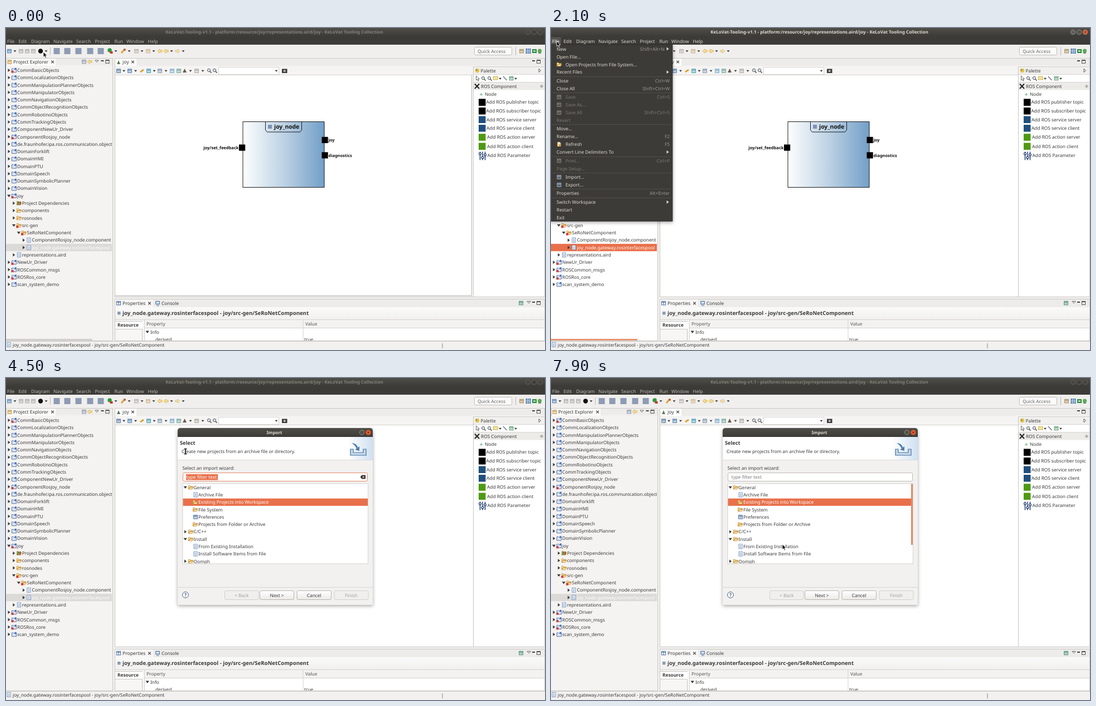
Recreate the animation shown at these times as an HTML page. Size 967 by 579 pixels, loop 8000 ms.

```html
<!DOCTYPE html>
<html lang="en">
<head>
<meta charset="utf-8">
<title>Modelling workbench</title>
<style>
html, body { margin: 0; width: 100%; height: 100%; overflow: hidden; background: #f2f1f0; }
svg { display: block; width: 967px; height: 579px; font: 8.3px "Noto Sans", "Open Sans", sans-serif; text-rendering: geometricPrecision; }
text { white-space: pre; }
</style>
</head>
<body>
<svg id="stage" viewBox="0 0 967 579" xmlns="http://www.w3.org/2000/svg"></svg>
<script>
const INK = '#3a3a3a', PALE = '#dfdbd2', DIM = '#7c7971', DARK = '#3c3b37', ORANGE = '#e8704a';
const BG = '#f2f1f0', LINE = '#c9c6c2';

const esc = s => s.replace(/&/g, '&amp;').replace(/</g, '&lt;').replace(/>/g, '&gt;');
// y is the middle of the text line
const text = (x, y, s, fill = INK, extra = '') =>
  `<text x="${x}" y="${y + 3}" fill="${fill}" ${extra}>${esc(s)}</text>`;
const bold = (x, y, s, size = 8.3, fill = INK, extra = '') =>
  text(x, y, s, fill, `font-weight="700" font-size="${size}" ${extra}`);
const box = (x, y, w, h, fill, extra = '') =>
  `<rect x="${x}" y="${y}" width="${w}" height="${h}" fill="${fill}" ${extra}/>`;
const path = (d, fill, extra = '') => `<path d="${d}" fill="${fill}" ${extra}/>`;
const line = (d, stroke, w = 1) => path(d, 'none', `stroke="${stroke}" stroke-width="${w}"`);
const dot = (x, y, r, fill, extra = '') => `<circle cx="${x}" cy="${y}" r="${r}" fill="${fill}" ${extra}/>`;
const group = (id, body, extra = '') => `<g id="${id}" ${extra}>${body}</g>`;

const down = (x, y, c = '#333') => path(`M${x - 2.5} ${y - 1.2}h5l-2.5 3z`, c);
const right = (x, y, c = '#333') => path(`M${x - 1.5} ${y - 3}v6l4-3z`, c);
const twisty = (x, y, open) => open ? path(`M${x - 3} ${y - 2}h6.4l-3.2 4.4z`, INK) : right(x, y, INK);
const folder = (x, y) => path(`M${x - 4} ${y + 3.2}v-6.4h3l1 1.4h4v1.2h-6l-2 3.8 2.2-3.2h6.4l-2 3.2z`,
  '#fbe3ac', 'stroke="#c08a2c" stroke-width=".8"');
const page = (x, y, c = '#5b7fb5') => box(x - 3, y - 4, 6.2, 8, '#fff', `stroke="${c}" stroke-width=".8"`) +
  line(`M${x - 1.6} ${y - 1.5}h3.4M${x - 1.6} ${y + .3}h3.4M${x - 1.6} ${y + 2}h3.4`, c, .7);
const project = (x, y, bad) => path(`M${x - 4} ${y + 3.6}v-6.6h3l1 1.2h4v5.4z`, '#dbe6f6', 'stroke="#49679f" stroke-width=".9"') +
  box(x + 1, y - 4.2, 3.4, 3.4, '#4a74bd') + (bad ? box(x - 5, y + .6, 4, 4, '#d9363a') : '');
const block = (x, y, c) => box(x - 3.4, y - 3.2, 6.8, 6.6, c, 'fill-opacity=".35" stroke="' + c + '" stroke-width=".9"') +
  line(`M${x - 3.4} ${y - 1.4}h6.8`, c, 1);
const backArrow = (x, y, dir, c = '#d8a52c') =>
  path(`M${x - 4 * dir} ${y}l${4 * dir} -3.5v2h${4 * dir}v3h${-4 * dir}v2z`, '#f8e3a6', `stroke="${c}" stroke-width=".8"`);
const cross = (x, y, c = '#555') => line(`M${x - 2.3} ${y - 2.3}l4.6 4.6m0 -4.6l-4.6 4.6`, c, 1.3);
const lens = (x, y) => dot(x - 1, y - 1, 2.6, '#dcebf8', 'stroke="#555" stroke-width="1"') + line(`M${x + 1} ${y + 1}l2.6 2.6`, '#555', 1.5);
const paneButtons = (x, y) => line(`M${x} ${y - 1.5}h5`, '#444', 2) +
  box(x + 8.5, y - 2.8, 6, 5.6, '#fff', 'stroke="#444"') + line(`M${x + 8.5} ${y - 2.2}h6`, '#444', 1.4);

function titleBar(on) {
  const ring = on ? '#8b8880' : '#66645e';
  return text(481.5, 7, 'KeLoVat-Tooling-v1.1 - platform:/resource/joy/representations.aird/joy - KeLoVat Tooling Collection',
      on ? PALE : '#85827b', 'text-anchor="middle" font-weight="700" font-size="7.95"') +
    [936.5, 947.5, 958.5].map((x, i) => dot(x, 7.5, 4.4, on && i == 2 ? '#ea5a30' : on ? '#6b6963' : '#4b4a45', `stroke="${ring}" stroke-width=".7"`)).join('') +
    line('M934.5 7.5h4M945.8 5.8h3.6v3.4h-3.6zM957 6l3 3m0 -3l-3 3', on ? '#33322e' : '#2e2d2a', .9) +
    [['File', 2], ['Edit', 22.5], ['Diagram', 45], ['Navigate', 85], ['Search', 126], ['Project', 159.5],
     ['Run', 194.5], ['Window', 216], ['Help', 254.5]].map(([s, x]) => text(x, 23.5, s, on ? PALE : '#bdb9b1')).join('');
}

function toolbar() {
  const marks = [[6, '#4d7fb5'], [27, '#a9a9a9'], [38, '#a9a9a9'], [49, '#a9a9a9'], [234, '#b5b0a6'], [255, '#cbb68a'], [925, '#a58a55']];
  return box(0, 30, 967, 22, '#f0efed') +
    marks.map(([x, c]) => block(x, 41.5, c)).join('') +
    dot(62, 41.5, 4.2, '#111') +
    [91, 110, 130, 151, 170].map(x => box(x - 5.5, 36, 11, 11, '#8d9bb3')).join('') +
    dot(186, 40, 3.8, '#2f9a45') + box(186.5, 42, 5, 4, '#c33a32') +
    line('M207 45l6-7', '#e0a040', 3) + dot(213, 39, 2, '#b5652a') +
    backArrow(276, 41.5, 1) + backArrow(287, 41.5, 1) + backArrow(308, 41.5, -1, '#cfb87d') +
    [16, 72, 197, 221, 244, 265, 297, 318].map(x => down(x, 41.5)).join('') +
    line('M79.5 35v13M914.5 34v15', '#bdbab5') +
    box(840.5, 34.5, 67, 14, '#fbfbfa', 'rx="2" stroke="#c0bdb8"') + text(846, 41.5, 'Quick Access', '#666') +
    box(932.5, 37, 9, 9, '#3d6da8') + line('M935.5 37v9M938.5 37v9M932.5 40h9M932.5 43h9', '#fff', .8) +
    box(944, 38, 8, 7, '#2e8b3d') + line('M946 41.5h4', '#fff', 2) + dot(957.5, 41, 3.6, '#5da95a') + line('M955 45l5 0', '#4b7e4a', 1.6);
}

const TREE = `0-!CommBasicObjects|0-CommLocalizationObjects|0-CommManipulationPlannerObjects|0-CommManipulatorObjects|0-CommNavigationObjects|0-CommObjectRecognitionObjects|0-CommRobotinoObjects|0-CommTrackingObjects|0-ComponentNewUr_Driver|0-!ComponentRosjoy_node|0-de.fraunhofer.ipa.ros.communication.objects|0-DomainForklift|0-DomainHMI|0-DomainPTU|0-DomainSpeech|0-DomainSymbolicPlanner|0-DomainVision|0+!joy|1-Project Dependencies|1-components|1-rosnodes|1+!src-gen|2+!SeRoNetComponent|3-ComponentRosjoy_node.component|3-joy_node.gateway.rosinterfacespool|1-representations.aird|0-!NewUr_Driver|0-!ROSCommon_msgs|0-!ROSRos_core|0-scan_system_demo`;
const PICKED = 24;

function tree(on) {
  const rows = TREE.split('|').map((row, i) => {
    const [, lvl, sign, bad, name] = row.match(/(\d)(.)(!?)(.*)/);
    const y = 76 + i * 13.28, x = 5 + lvl * 8.8, ix = x + 9.5;
    const isFile = lvl == 3 || name.endsWith('.aird');
    const icon = lvl == 0 ? project(ix, y, bad) : isFile ? page(ix, y) :
      folder(ix, y) + (i == 18 ? box(ix - 3, y - 3, 3, 6, '#4d8b53') + box(ix + .5, y - 3, 3, 6, '#b55b34') : '') +
      (bad ? box(ix - 5, y + .6, 4, 4, '#d9363a') : '');
    const hit = i == PICKED;
    return (hit ? box(0, y - 6.6, 191, 13.2, on ? ORANGE : '#dcdad7') : '') +
      twisty(x, y, sign == '+') + icon + text(x + 15, y, name, hit ? '#fff' : INK);
  }).join('');
  return box(0, 68, 191, 494, on ? '#fff' : '#f4f3f1') + `<g clip-path="url(#treeClip)">${rows}</g>`;
}

function explorer() {
  return box(0.5, 54.5, 191, 508, '#fafaf9', `stroke="${LINE}"`) + box(89, 55, 102, 12.5, '#edecea') +
    block(6.5, 61, '#c9963d') + text(13, 61, 'Project Explorer', INK, 'font-size="8.45"') + cross(83.5, 61) +
    block(140, 60.5, '#8d9bb3') + backArrow(150, 60.5, 1) + path('M160 58h6l-3 3.5z', '#fff', 'stroke="#444" stroke-width=".8"') + paneButtons(170.5, 60.5);
}

function editor() {
  const tools = [[202, '#51779e'], [222, '#4f7fb0'], [256, '#3f9bb5'], [276, '#7f93ad'], [298, '#74a6cb'], [310, '#6aa19a'], [342, '#aba79f']];
  return box(195.5, 54.5, 771, 429, '#fff', `stroke="${LINE}"`) + box(234, 55, 732, 13, '#edecea') +
    box(196, 68, 642, 16, '#f5f4f3') + line('M196 84.5h642', '#d5d2ce') +
    path('M199 65l3-7 3 7z', '#5c7c57') + text(209, 61, 'joy', INK, 'font-size="8.6"') + cross(227.5, 61) + paneButtons(944, 60.5) +
    tools.map(([x, c]) => block(x, 77, c)).join('') +
    line('M241 79l6-4', '#d9a431', 3) + path('M317 80l3.5-7 3.5 7z', '#6b5b49') +
    [211.5, 232.5, 266, 287, 331, 353].map(x => down(x, 77)).join('') + lens(365, 77) + lens(375, 77) +
    box(381.5, 70.5, 108, 13, '#fff', 'stroke="#d9d6d2"') + down(485, 77) +
    box(495, 73.5, 9.5, 7.5, '#3b3b3b') + dot(499.7, 77.3, 2, '#bbb') +
    box(425, 168.5, 146, 118, 'url(#steel)', 'stroke="#1b1b1b"') +
    path('M465.5 168.5v15l3 3.5h59l3-3.5v-15z', 'none', 'stroke="#1b1b1b"') +
    box(470, 174, 7, 7, '#7d92b4') + bold(481, 177.6, 'joy_node', 10.3, '#111') +
    [[418, 209.5], [566.5, 195.8], [566.5, 223.3]].map(([x, y]) => box(x, y, 11.2, 11.2, '#000')).join('') +
    bold(417.5, 214.5, 'joy/set_feedback', 7.55, '#111', 'text-anchor="end"') +
    bold(578.5, 200.8, 'joy', 7.5, '#111') + bold(578.5, 228.5, 'diagnostics', 7.4, '#111');
}

function palette() {
  const items = [['publisher topic', 861.5, 133.4, '#000'], ['subscriber topic', 861.5, 149, '#000'], ['service server', 862, 164.5, '#204f7e'],
    ['service client', 862, 180, '#204f7e'], ['action server', 863, 196.2, '#4e9a14'], ['action client', 863, 212.5, '#4e9a14']];
  return box(838.5, 69.5, 128, 414, '#fff', `stroke="${LINE}"`) + box(839, 70, 127, 13.5, '#f1f0ee') +
    dot(845.5, 76.5, 3.8, '#e6c34d') + dot(844, 75.5, 1.2, '#4b8b50') + text(851.5, 76.5, 'Palette') +
    path('M956 73.5v6l3.5-3z', '#fff', 'stroke="#444" stroke-width=".9"') + line('M839 83.5h127M839 97.5h127', '#d8d5d1') +
    path('M843.5 86v8l2-1.8 1.5 3 1.2-.7-1.4-2.9h2.6z', '#fff', 'stroke="#444" stroke-width=".8"') + lens(857, 91) + lens(868, 91) +
    box(874.5, 87.5, 7.5, 5.5, '#f7e79b', 'stroke="#b99d33" stroke-width=".8"') + down(886.5, 91) +
    line('M892 87l6.5 7', '#5f6b82', 1.2) + block(906.5, 90.5, '#5a9a6e') + down(914.5, 91) +
    box(839, 98, 127, 13.5, '#ecebe8') + line('M841 109l8-8.5m-8 0l8 8.5', '#222', 2) + text(852, 105, 'ROS Component') +
    path('M958 104.8l2.5-2.2v4.4zM963.5 104.8l-2-2.2v4.4z', 'none', 'stroke="#888" stroke-width=".7"') +
    path('M849.5 119.5l3.2-3.2 3.2 3.2-3.2 3.2z', '#9cc9a8', 'stroke="#fff"') + text(859, 119.4, 'Node') +
    items.map(([s, x, y, c]) => box(848, y - 6, 12.5, 12.5, c) + text(x, y, 'Add ROS ' + s)).join('') +
    line('M850.5 222.5v15M855 222.5v15M859.5 222.5v15', '#1f3d74', 1.5) +
    [[850.5, 226], [855, 233], [859.5, 228]].map(([x, y]) => dot(x, y, 1.9, '#fff', 'stroke="#1f3d74" stroke-width="1.3"')).join('') + text(863.5, 229.4, 'Add ROS Parameter');
}

const SPOT = 'joy_node.gateway.rosinterfacespool - joy/src-gen/SeRoNetComponent';
function properties() {
  return box(195.5, 487.5, 771, 75, '#f7f6f5', `stroke="${LINE}"`) + box(264, 488, 702, 14, '#edecea') +
    box(198.5, 491.5, 7, 6.5, '#fff', 'stroke="#466b9c"') + line('M198.5 493.5h7M202 492v6', '#466b9c') +
    text(209, 495, 'Properties', INK, 'font-size="8.5"') + cross(257.5, 495) +
    box(268.8, 491.5, 6.5, 5, '#d8e6f5', 'stroke="#3f6797"') + line('M270 499h4.5', '#3f6797') + text(279, 495.2, 'Console') +
    block(924, 494.5, '#4f8f7d') + path('M935 491.5h6l-3 3.5z', '#fff', 'stroke="#444" stroke-width=".8"') + paneButtons(944, 494.5) +
    box(196, 502, 770, 22, 'url(#band)') + line('M196 524.5h770', '#d5d2ce') +
    box(200, 510, 5.5, 5.5, '#8d9bb3') + bold(209, 512.6, SPOT, 9.6) +
    box(196, 527.5, 49, 13.5, '#fff') + line('M196 527.5h49M196 541.5h48.5v20.5', LINE) + bold(200, 534, 'Resource') +
    box(248, 525, 718, 37, '#fff') + box(248, 525, 718, 14, '#f3f2f1') +
    line('M248.5 525v37M533 525v37M248 539.5h718', '#d5d2ce') +
    text(252, 532, 'Property', '#555') + text(537, 532, 'Value', '#555') + twisty(253.5, 546.5, true) + text(259, 546.5, 'Info') +
    `<g clip-path="url(#propClip)">${text(268, 560, 'derived')}${text(535, 560, 'true')}</g>`;
}

function menuPanel(w, h, rows, seps) {
  return rows.map(r => {
    const [flag, s, y, x, key] = r, c = flag.includes('d') ? DIM : PALE;
    return text(x, y, s, c) + (key ? text(w - 5, y, key, flag.includes('d') ? DIM : '#9a978f', 'text-anchor="end"') : '') +
      (flag.includes('>') ? right(w - 9, y, PALE) : '') +
      (flag.includes('i') ? block(x - 11.5, y, flag.includes('d') ? '#85827a' : '#9db4cc') : '');
  }).join('') + seps.map(y => line(`M2 ${y + .5}h${w - 4}`, '#4f4e49')).join('');
}

function editMenu() {
  const rows = [['d', 'Undo', 37, 27, 'Ctrl+Z'], ['d', 'Redo', 51, 27, 'Shift+Ctrl+Z'], ['d', 'Cut', 67, 27, 'Ctrl+X'],
    ['i', 'Copy', 81, 27, 'Ctrl+C'], ['di', 'Paste', 95, 27, 'Ctrl+V'], ['', 'Delete', 110, 27], ['d', 'Select All', 124, 10.5, 'Ctrl+A'],
    ['d', 'Deselect All', 138, 27], ['d', 'Find/Replace...', 154, 10.5, 'Ctrl+F'], ['', 'Add Bookmark...', 169, 10.5], ['', 'Add Task...', 183, 10.5],
    ['di', 'Copy format', 198.5, 27, 'Shift+Ctrl+Alt+C'], ['di', 'Paste format', 212.5, 27, 'Shift+Ctrl+Alt+V'], ['di', 'Paste layout', 226.5, 27], ['di', 'Paste style', 240.5, 27]];
  return box(21, 16.5, 20, 14, '#55544f', 'rx="2"') + text(22.5, 23.5, 'Edit', '#fff') +
    box(20, 30, 155.5, 217, DARK, 'stroke="#2f2e2b" stroke-width=".8" filter="url(#shade)"') +
    `<g transform="translate(20 0)">${menuPanel(155, 217, rows, [59, 102, 146, 161, 190])}${backArrow(15.5, 37, 1, '#8b7c52')}${backArrow(15.5, 51, -1, '#8b7c52')}${cross(15.5, 110, '#e04a3c')}${cross(15.5, 67, DIM)}</g>`;
}

function fileMenu() {
  const a = 10, b = 26;
  const rows = [['>', 'New', 37.5, a], ['', 'Open File...', 51.5, a], ['', 'Open Projects from File System...', 65.5, b], ['>', 'Recent Files', 79.3, a],
    ['', 'Close', 94.8, a, 'Ctrl+W'], ['', 'Close All', 108.5, a, 'Shift+Ctrl+W'], ['di', 'Save', 124, b, 'Ctrl+S'], ['di', 'Save As...', 138, b],
    ['di', 'Save All', 152, b, 'Shift+Ctrl+S'], ['d', 'Revert', 166, a], ['', 'Move...', 181.3, a], ['', 'Rename...', 195.3, a, 'F2'], ['', 'Refresh', 209, b, 'F5'],
    ['>', 'Convert Line Delimiters To', 223, a], ['di', 'Print...', 238.5, b, 'Ctrl+P'], ['d', 'Page Setup...', 252.5, a], ['i', 'Import...', 268, b],
    ['i', 'Export...', 282, b], ['', 'Properties', 297.3, a, 'Alt+Enter'], ['>', 'Switch Workspace', 313, a], ['', 'Restart', 327, a], ['', 'Exit', 340.8, a]];
  return box(0, 16.5, 18, 14, '#55544f', 'rx="2"') + text(2, 23.5, 'File', '#fff') +
    box(-1, 30, 219, 317.5, DARK, 'stroke="#2f2e2b" stroke-width=".8" filter="url(#shade)"') +
    box(0, 0, 218, 13.6, 'url(#warm)', 'id="hover"') +
    menuPanel(218, 317, rows, [87, 116, 173, 231, 260, 289, 305]) + text(203.5, 37.5, 'Shift+Alt+N', '#9a978f', 'text-anchor="end"') +
    folder(14.5, 65.5) + path('M11.5 205h4l2 2v6h-6z', '#f0dfae') + dot(15.5, 211, 2, '#d6a032');
}

const button = (x, w, s, off) => box(x + .5, 382.5, w - 1, 16, off ? '#f0efed' : 'url(#btn)', `rx="2.5" stroke="${off ? '#d3d0cc' : '#b8b4ae'}"`) +
  text(x + w / 2, 390.8, s, off ? '#a3a09b' : INK, 'text-anchor="middle"');

const WIZARDS = ['General', 'Archive File', 'Existing Projects into Workspace', 'File System', 'Preferences',
  'Projects from Folder or Archive', 'C/C++', 'Install', 'From Existing Installation', 'Install Software Items from File', 'Oomph'];
const rowY = i => 196.7 + i * 13.28;

function dialog() {
  const rows = WIZARDS.map((s, i) => {
    const y = rowY(i), top = [0, 6, 7, 10].includes(i);
    if (top) return twisty(321.5, y, i == 0 || i == 7) + folder(331.5, y) + text(336.5, y, s);
    const icon = i == 1 || i > 7 ? page(340, y) : i == 4 ? block(340, y, '#4a6f9f') : folder(339.5, y);
    return icon + `<text id="w${i}" x="345" y="${y + 3}" fill="${INK}">${s}</text>`;
  }).join('');
  return path('M308 408V95q0-5 5-5h340q5 0 5 5v313z', BG, 'filter="url(#shade)"') +
    path('M308 106V95q0-5 5-5h340q5 0 5 5v11z', 'url(#bar)') + bold(481.5, 98, 'Import', 8, PALE, 'text-anchor="middle"') +
    dot(638.5, 98, 4.4, '#6b6963', 'stroke="#8b8880" stroke-width=".7"') + dot(650, 98, 4.6, '#ea5a30') +
    line('M636.8 96.5h3.4v3.2h-3.4zM648.4 96.4l3.2 3.2m0 -3.2l-3.2 3.2', '#3a2018', .9) +
    box(308, 106, 350, 41, '#fff') + box(612, 106, 46, 41, 'url(#sky)') + line('M308 147.5h350', '#dcd9d5') +
    bold(312, 116.7, 'Select', 9.2) + group('d2', text(315, 132, 'Create new projects from an archive file or directory.')) +
    group('d3', text(315, 132, 'Import resources from the local file system into an existing project.')) +
    path('M618 128h5v6h18v-6h5v11h-28z', '#c6d8ea', 'stroke="#47719f" stroke-width="1.2"') +
    path('M620 117q9 0 11 8l3-2 0 8-8-2 3-2q-3-7-9-10z', '#4f7cab') +
    text(316.5, 162, 'Select an import wizard:') +
    group('filterOn', box(317.5, 170.5, 331, 15, '#fff', 'rx="2" stroke="#e58a6a"') + box(323, 173, 57, 10.5, ORANGE) + text(323.5, 178.3, 'type filter text', '#fff') +
      path('M635.5 178l3-3.5h6.5v7h-6.5z', '#333') + line('M639.5 176.3l3.4 3.4m0 -3.4l-3.4 3.4', '#fff', 1)) +
    group('filterOff', box(317.5, 170.5, 331, 15, '#fff', 'rx="2" stroke="#bfbbb6"') + text(323.5, 178.3, 'type filter text', '#777')) +
    box(317, 190, 332.5, 144, '#fff', 'stroke="#d2cfcb" stroke-width=".9"') +
    box(317.5, 0, 331.5, 13.2, ORANGE, 'id="pick"') + `<g clip-path="url(#listClip)">${rows}</g>` +
    box(646, 190.5, 3, 109.5, '#e08d69', 'id="listBar"') +
    line('M308 376.5h350', '#d9d6d2') + dot(322, 390, 5.4, '#fdfdfd', 'stroke="#4b5d7c"') + bold(322, 390, '?', 8.3, '#3b5280', 'text-anchor="middle"') +
    button(392, 61.5, '< Back', true) + button(455, 62, 'Next >') + button(521.5, 62.5, 'Cancel') + button(588.5, 62, 'Finish', true);
}

const grad = (id, dir, ...stops) => `<linearGradient id="${id}" x2="${dir == 'h' ? 1 : 0}" y2="${dir == 'h' ? 0 : 1}">` +
  stops.map((c, i) => `<stop offset="${i / (stops.length - 1)}" stop-color="${c}"/>`).join('') + '</linearGradient>';
const clip = (id, x, y, w, h) => `<clipPath id="${id}">${box(x, y, w, h, '#000')}</clipPath>`;

document.getElementById('stage').innerHTML =
  `<defs>${grad('steel', 'h', '#fdfefe', '#bdd2e4', '#739fc8')}${grad('bar', 'v', '#504e49', DARK)}${grad('warm', 'v', '#f07d55', '#e2623a')}` +
  grad('btn', 'v', '#fff', '#eceae8') + grad('sky', 'h', '#fff', '#cfe0f1') + grad('band', 'v', '#fafafa', '#f1f0ee') +
  clip('treeClip', 0, 68, 190, 494) + clip('propClip', 249, 540, 716, 22) + clip('listClip', 317, 190, 332, 143.5) +
  '<filter id="shade" x="-10%" y="-10%" width="120%" height="120%"><feDropShadow dx="0" dy="2" stdDeviation="3" flood-opacity=".35"/></filter></defs>' +
  box(0, 0, 967, 579, BG) + box(0, 0, 967, 15, 'url(#bar)') + box(0, 14, 967, 16.5, DARK) +
  group('barOn', titleBar(true)) + group('barOff', titleBar(false)) + toolbar() + explorer() +
  group('treeOn', tree(true)) + group('treeOff', tree(false)) + box(0, 559, 155, 2.6, '#e58a66', 'id="treeBar"') +
  editor() + group('editBars', box(834.5, 85, 2, 396, 'currentColor') + box(196, 480.3, 640, 2, 'currentColor')) + palette() + properties() +
  line('M0 563.5h967', '#d5d2ce') + page(5, 569.5) + text(12, 570, SPOT) + line('M783 567v9', '#999', 1.2) +
  group('editMenu', editMenu()) + group('fileMenu', fileMenu()) + group('dialog', dialog()) +
  group('arrow', path('M0 0v9.4l2.2-2 1.6 3.6 1.7-.8-1.6-3.4h3.1z', '#111', 'stroke="#fff" stroke-width=".8"')) +
  group('beam', line('M-2.5 -4.5h5M0 -4.5v9M-2.5 4.5h5', '#111', 1.6));

const el = id => document.getElementById(id);
const show = (id, on) => { el(id).style.display = on ? '' : 'none'; };

// time, x, y of the pointer
const POINTER = [[0, 67, 43], [100, 67, 43], [400, 21, 30], [500, 21, 30], [700, 18, 29], [1800, 18, 29], [2000, 10, 22], [2400, 10, 28],
  [2700, 8, 45], [3300, 26, 252], [3600, 28, 268], [3900, 28, 268], [4100, 88, 297], [4200, 88, 297], [4500, 322, 132], [4700, 330, 138],
  [5000, 420, 219], [5200, 420, 221], [5600, 486, 387], [5900, 486, 387], [6200, 400, 290], [6400, 366, 232], [6500, 367, 230],
  [7000, 367, 230], [7300, 395, 221], [7500, 395, 221], [7900, 415, 299]];
// time and row middle of the menu highlight
const HOVER = [[2600, 51.5], [2700, 79.3], [2800, 94.8], [2900, 108.5], [3000, 181.3], [3100, 209], [3200, 223], [3300, 0], [3500, 268]];

const last = (list, t) => list.filter(k => k[0] <= t).pop();
function pointer(t) {
  const a = last(POINTER, t), b = POINTER[POINTER.indexOf(a) + 1] || a;
  const f = b === a ? 0 : (t - a[0]) / (b[0] - a[0]);
  return [a[1] + (b[1] - a[1]) * f, a[2] + (b[2] - a[2]) * f];
}

function draw(ms) {
  const t = Math.floor(ms % 8000 / 100) * 100;
  const within = (a, b) => t >= a && t < b;
  const on = within(900, 3800);
  show('barOn', on); show('barOff', !on);
  show('treeOn', on); show('treeOff', !on);
  show('treeBar', t < 300 || within(900, 2200));
  el('treeBar').setAttribute('fill', on ? '#e58a66' : '#cfccc8');
  show('editBars', t < 1700);
  el('editBars').setAttribute('color', on ? '#f4e2d6' : '#d3d1ce');
  show('editMenu', within(1100, 2000));
  show('fileMenu', within(2000, 3800));
  const h = last(HOVER, t);
  show('hover', h && h[1] > 0);
  if (h) el('hover').setAttribute('y', h[1] - 6.9);

  show('dialog', t >= 3900);
  const row = within(6400, 7300) ? 3 : 2;
  el('pick').setAttribute('y', rowY(row) - 6.6);
  for (const i of [2, 3]) {
    show('d' + i, i == row);
    el('w' + i).setAttribute('fill', i == row ? '#fff' : INK);
  }
  show('filterOn', t < 5200); show('filterOff', t >= 5200);
  show('listBar', t >= 5000);

  const [x, y] = pointer(t), beam = within(4500, 4800);
  show('beam', beam); show('arrow', !beam);
  el(beam ? 'beam' : 'arrow').setAttribute('transform', `translate(${x} ${y})`);
}

const start = performance.now();
function tick() {
  draw(performance.now() - start);
  requestAnimationFrame(tick);
}
tick();
</script>
</body>
</html>
```
